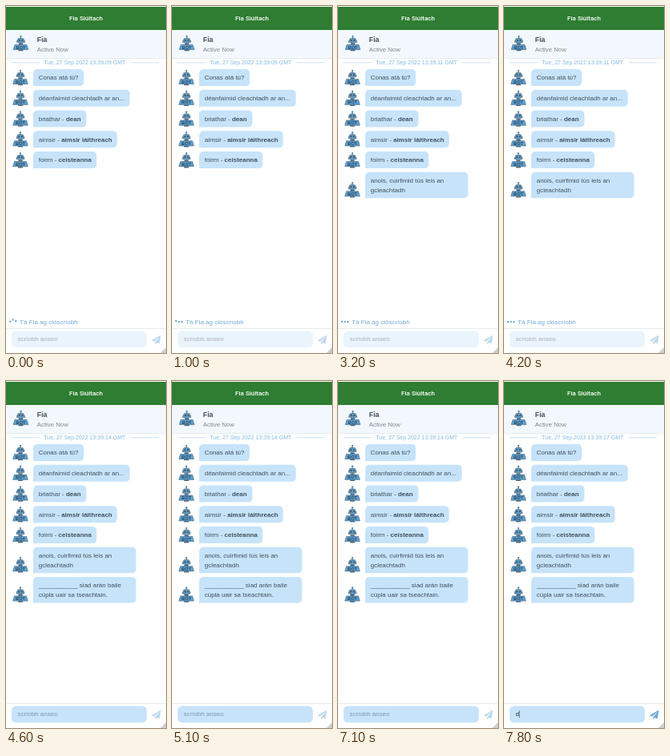
Recreate the animation shown at these times as an HTML page. Size 200 by 434 pixels, loop 8 s.

```html
<!DOCTYPE html>
<html lang="ga">
<head>
<meta charset="utf-8">
<title>Chat</title>
<style>
  html, body { margin: 0; width: 100%; height: 100%; overflow: hidden; background: #fff; }
  svg { display: block; width: 100%; height: 100%; }
  text { font: 8px "Liberation Sans", Arial, sans-serif; fill: #42505c; white-space: pre; }
  .bold { font-weight: bold; }
  .mid { text-anchor: middle; }
</style>
</head>
<body>
<svg viewBox="0 0 200 434">
  <defs>
    <g id="robot">
      <path d="M10.5 2V5M5.8 7V10M15.2 7V10" stroke="#5b7488" stroke-width="1"/>
      <circle cx="10.5" cy="2" r="1.2" fill="#5a91b5"/>
      <rect x="6.5" y="4.4" width="8" height="5.8" rx="2" fill="#5f9cc4" stroke="#4c667c" stroke-width=".7"/>
      <circle cx="8.7" cy="7" r="1" fill="#34495c"/>
      <circle cx="12.3" cy="7" r="1" fill="#34495c"/>
      <path d="M8 10.6h5v2H8zM7 18h7l-.8 2.3H7.8z" fill="#4c667c"/>
      <path d="M3 12.4h15l1.8 6.2H1.2z" fill="#5c9fce" stroke="#4c708d" stroke-width=".7"/>
      <text class="bold mid" x="10.5" y="17.5" style="font-size:5.6px;fill:#2f475c">BOT</text>
    </g>
  </defs>

  <rect y="1" width="200" height="29" fill="#2e7d32"/>
  <text class="mid" x="100" y="18.3" style="font:500 8px Roboto,sans-serif;fill:#fff">Fia Siúltach</text>

  <rect y="30" width="200" height="35.5" fill="#f2f8fd"/>
  <path d="M0 65.7H200" stroke="#d5e1eb" stroke-width=".6"/>
  <use href="#robot" x="8" y="36"/>
  <text class="bold" x="38.8" y="45" style="font-size:8.8px">Fia</text>
  <text x="38.8" y="56.8" style="font-size:7.8px;fill:#7b858e">Active Now</text>

  <path d="M7 70.8H42M156 70.8H191" stroke="#b3d6ef" stroke-width=".7"/>
  <text id="date" class="mid" x="98.3" y="73.3" style="font-size:7px;fill:#7fb9e3"></text>

  <g id="chat"></g>

  <g id="typing" fill="#6ea9d7">
    <circle cx="5.1" r="1.2"/><circle cx="8.7" r="1.2"/><circle cx="12.3" r="1.2"/>
    <text x="17.2" y="397.5" style="fill:#6ea9d7">Tá Fia ag clóscríobh</text>
  </g>

  <path d="M0 403.5H200" stroke="#d5dfe7" stroke-width=".6"/>
  <g id="field">
    <rect x="7" y="406.5" width="169" height="20.8" rx="5.6" fill="#c6e3fa"/>
    <text id="entry" x="14.4" y="419.2"></text>
  </g>
  <path id="caret" d="M19.2 412.2v9" stroke="#42505c" stroke-width=".7"/>
  <path id="send" transform="translate(182.5 412) scale(.0215)" fill="#6ea9d7"
    d="M476 3L13 270c-18 10-16 36 2 44l106 44L407 106c5-5 13 2 8 8L176 405v80c0 23 28 33 42 15l63-77 124 52c14 6 30-3 33-18l71-424c3-20-18-35-36-24z"/>
  <path d="M200 427v7h-7z" fill="#cfcfcf"/>
</svg>

<script>
const LOOP = 8000, FIRST = 1500, SECOND = 4600, KEY = 7500;
const LINE = 11.44, PAD = 4.8, RADIUS = 5.6;
const $ = id => document.getElementById(id);

// Each message: bubble width, time of arrival, lines; *stars* mark bold text.
const messages = [
  [63.2, 0, "Conas atá tú?"],
  [120.8, 0, "déanfaimid cleachtadh ar an..."],
  [66.5, 0, "briathar - *dean*"],
  [104.8, 0, "aimsir - *aimsir láithreach*"],
  [79.3, 0, "foirm - *ceisteanna*"],
  [128.6, FIRST, "anois, cuirfimid tús leis an", "gcleachtadh"],
  [128.6, SECOND, "_".repeat(11) + " siad arán baile", "cúpla uair sa tseachtain."]
];

let y = 79;
$("chat").innerHTML = messages.map(([w, , ...lines]) => {
  const h = lines.length * LINE + 2 * PAD, top = y, r = RADIUS;
  y += h + PAD - .08;
  const text = lines.map((s, i) =>
    `<text x="40.7" y="${top + PAD + LINE * (i + .5) + 2.77}">` +
    s.replace(/\*(.+)\*/, '<tspan class="bold">$1</tspan>') + "</text>").join("");
  return `<g><use href="#robot" x="7.5" y="${top + h - 21}"/>
    <path fill="#c6e3fa" d="M34 ${top + h}v${r - h}q0 ${-r} ${r} ${-r}h${w - 2 * r}q${r} 0 ${r} ${r}v${h - 2 * r}q0 ${r} ${-r} ${r}z"/>${text}</g>`;
}).join("");

const bubbles = [...$("chat").children];
const dots = $("typing").querySelectorAll("circle");
const show = (el, on) => el.setAttribute("visibility", on ? "visible" : "hidden");
const ease = x => x * x * (3 - 2 * x);

// Height of a hopping dot: up by 28% of the cycle, down by 44%, then rest.
function hop(ms) {
  const p = ms < 0 ? 0 : ms % 1400 / 1400;
  return p < .28 ? ease(p / .28) : p < .44 ? ease((.44 - p) / .16) : 0;
}

function draw(t) {
  const typed = t >= KEY, open = t >= SECOND;
  const second = typed ? 17 : open ? 14 : t >= FIRST ? 11 : "09";
  $("date").textContent = `Tue, 27 Sep 2022 13:39:${second} GMT`;
  bubbles.forEach((b, i) => show(b, t >= messages[i][1]));

  const start = t < FIRST ? -560 : 1720;
  dots.forEach((d, i) => d.setAttribute("cy", 395 - 2.7 * hop(t - start - 200 * i)));
  show($("typing"), !open);

  $("field").setAttribute("opacity", open ? 1 : .38);
  $("entry").textContent = typed ? "d" : "scríobh anseo";
  $("entry").style.fill = open && !typed ? "#8296a8" : "#333";
  show($("caret"), typed);
  $("send").setAttribute("opacity", typed ? 1 : .45);
}

const begin = performance.now();
function tick() {
  draw((performance.now() - begin) % LOOP);
  requestAnimationFrame(tick);
}
tick();
</script>
</body>
</html>
```
